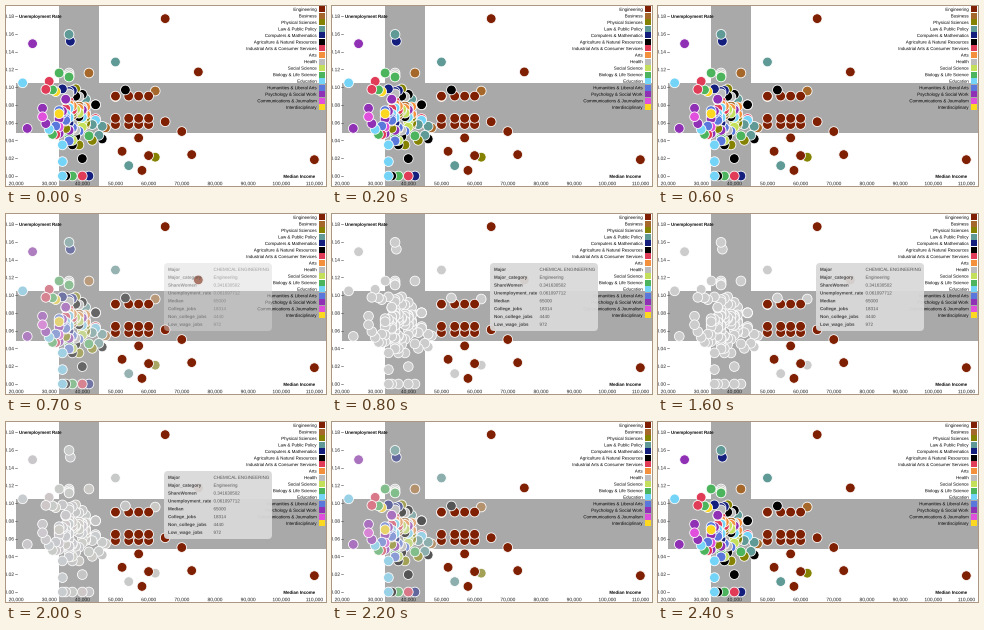
A matplotlib script for the animation above (2.5 s loop, 320 by 180 pixels).

```python
import random

import matplotlib.pyplot as plt
import numpy as np
from matplotlib.animation import FuncAnimation
from matplotlib.colors import to_rgb
from matplotlib.patches import FancyBboxPatch, PathPatch, Rectangle
from matplotlib.textpath import TextPath
from matplotlib.transforms import Affine2D

W, H, DPI = 320, 180, 100
FRAMES, STEP = 25, 100
PT = 72 / DPI
ENG = "Engineering"

# Categories run from the best paid to the worst paid
COLORS = {
    ENG: "#7f2003",
    "Business": "#a5682a",
    "Physical Sciences": "#848200",
    "Law & Public Policy": "#5f9a96",
    "Computers & Mathematics": "#141e7c",
    "Agriculture & Natural Resources": "#000000",
    "Industrial Arts & Consumer Services": "#e03c58",
    "Arts": "#f4903c",
    "Health": "#bcbcbc",
    "Social Science": "#c4e05a",
    "Biology & Life Science": "#4cb45c",
    "Education": "#74d4f8",
    "Humanities & Liberal Arts": "#5a78dc",
    "Psychology & Social Work": "#9030b4",
    "Communications & Journalism": "#e050dc",
    "Interdisciplinary": "#fcd820",
}
NAMES = list(COLORS)

# Standouts: median income in thousands, unemployment in percent
STANDOUTS = {
    ENG: [(110, 1.84), (75, 11.72), (73, 2.41), (70, 5.01), (65, 6.11),
          (65, 17.72), (60, 2.3), (58, .63), (57, 4.29), (52, 2.78)],
    "Business": [(62, 9.57)],
    "Physical Sciences": [(62, 2.12)],
    "Law & Public Policy": [(54, 1.17), (50, 12.84), (36, 15.95)],
    "Computers & Mathematics": [(42, 0), (36.4, 15.18)],
    "Agriculture & Natural Resources": [(53, 9.69), (40, 1.96), (35, 0)],
    "Industrial Arts & Consumer Services": [(40, 0)],
    "Arts": [(50, 8.94)],
    "Biology & Life Science": [(37, 0)],
    "Education": [(22, 10.49), (34, 0), (34, 1.62)],
    "Psychology & Social Work": [(25, 14.9), (23.4, 5.36)],
}
TIP = {
    "Major": "CHEMICAL ENGINEERING",
    "Major_category": ENG,
    "ShareWomen": "0.341630502",
    "Unemployment_rate": "0.061097712",
    "Median": "65000",
    "College_jobs": "18314",
    "Non_college_jobs": "4440",
    "Low_wage_jobs": "972",
}


def px(income):
    return 10 + (income - 20) * 3.315


def py(rate):
    return 170 - rate * 8.88


def smooth(v):
    v = min(max(v, 0), 1)
    return v * v * (3 - 2 * v)


def build_points():
    """Standouts, columns of engineers, and a crowd per category."""
    rng = random.Random(4)
    pts = [(m, r, c) for c, rows in STANDOUTS.items() for m, r in rows]
    for income in (50, 54, 57, 60):
        pts += [(income, r, ENG) for r in (5.8, 6.5, 9)]
    for k, name in enumerate(NAMES[1:], 1):
        for _ in range(8 if k < 14 else 2):
            income = round(rng.gauss(41 - .65 * k, 4))
            rate = rng.gauss(7.2, 2)
            pts.append((min(max(income, 26), 47), min(max(rate, 3.5), 11.6),
                        name))
    return sorted(pts, key=lambda p: -p[0])


fig = plt.figure(figsize=(W / DPI, H / DPI), dpi=DPI, facecolor="white")
ax = fig.add_axes([0, 0, 1, 1])
ax.set_xlim(0, W)
ax.set_ylim(H, 0)
ax.axis("off")


def label(x, y, s, size=4.4, align=0, z=5, weight="normal", color="black"):
    """Outlined text, centred on y; align is 0 left, .5 centre, 1 right."""
    path = TextPath((0, 0), s, size=size,
                    prop={"family": "Liberation Sans", "weight": weight})
    x -= align * path.get_extents().x1
    path = path.transformed(Affine2D().scale(1, -1).translate(x, y + .36 * size))
    return ax.add_patch(PathPatch(path, fc=color, lw=0, zorder=z, snap=False))


def box(x, y, w, h, color, z=1):
    ax.add_patch(Rectangle((x, y), w, h, fc=color, lw=0, zorder=z))


# Bands and axes
box(53, 0, 40, H, "#a9a9a9")
box(10, 77, W - 10, 50, "#a9a9a9")
for k in range(20, 111, 10):
    label(px(k), 177.4, f"{k},000", 4.9, .5, color="#222222")
for k in range(0, 19, 2):
    label(7.8, py(k), f"{k / 100:.2f}", 4.9, 1, color="#222222")
    ax.plot([9, 11.3], [py(k)] * 2, color="#444444", lw=.4, zorder=2)
label(13, 10.3, "Unemployment Rate", weight="bold")
label(309, 170.3, "Median Income", align=1, weight="bold")

# Legend
for i, name in enumerate(NAMES):
    y = i * 6.53
    box(312.6, y + .3, 6, 6, COLORS[name], 5)
    label(310.5, y + 3.3, name, align=1)

# Dots
points = build_points()
income, rate, groups = zip(*points)
base = np.array([to_rgb(COLORS[g]) for g in groups])
faded = np.array([to_rgb(COLORS[g] if g == ENG else "#cccccc")
                  for g in groups])
dots = ax.scatter([px(m) for m in income], [py(r) for r in rate],
                  s=(9.7 * PT) ** 2, c=base, edgecolors="white",
                  linewidths=.8 * PT, zorder=4)

# Tooltip
tip = [ax.add_patch(FancyBboxPatch(
    (162, 53), 100, 60, fc="#d9d9d9", lw=0, zorder=7,
    boxstyle="round,pad=4,rounding_size=4"))]
for i, (key, value) in enumerate(TIP.items()):
    y = 55.3 + i * 7.85
    tip.append(label(162, y, key, 4.5, z=8, weight="bold", color="#444444"))
    tip.append(label(207.5, y, value, 4.5, z=8, color="#555555"))


def draw(i):
    t = i * STEP
    rise = smooth((t - 600) / 200)
    dim = rise * (1 - smooth((t - 1950) / 450))
    shown = rise * (1 - smooth((t - 2000) / 200))
    dots.set_facecolor(base + (faded - base) * dim)
    for item in tip:
        item.set_alpha(shown * (.94 if item is tip[0] else 1))
    return [dots, *tip]


anim = FuncAnimation(fig, draw, frames=FRAMES, interval=STEP, repeat=True,
                     repeat_delay=0)
plt.show()
```
